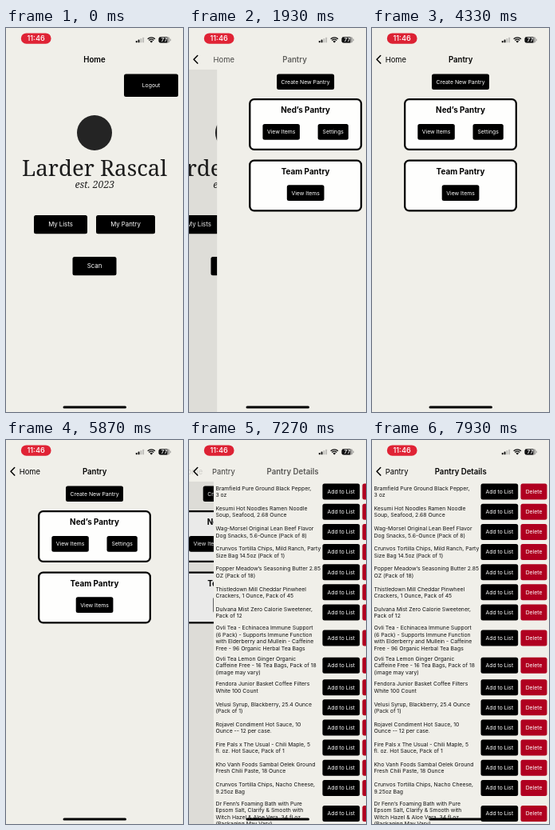
An HTML page with a canvas for the animation above (8000 ms loop, 222x480 px).

```html
<!DOCTYPE html>
<html lang="en">
<head>
<meta charset="utf-8">
<title>Pantry app</title>
<style>
html, body { margin: 0; width: 100%; height: 100%; overflow: hidden; background: #f0efe9; }
canvas { display: block; width: 100vw; height: 100vh; }
</style>
</head>
<body>
<canvas id="stage"></canvas>
<script>
const W = 222, H = 480, LOOP = 8000, TOP = 52;
const BG = '#f0efe9', INK = '#000', RED = '#b00020';
const SANS = 'Inter, Roboto, sans-serif', SERIF = '"Noto Serif", serif';
const PUSH_PANTRY = 1750, PUSH_DETAILS = 7081;

const canvas = document.getElementById('stage');
const c = canvas.getContext('2d');

const items = [
  ['Bramfield Pure Ground Black Pepper,', '3 oz'],
  ['Kesumi Hot Noodles Ramen Noodle', 'Soup, Seafood, 2.68 Ounce'],
  ['Wag-Morsel Original Lean Beef Flavor', 'Dog Snacks, 5.6-Ounce (Pack of 8)'],
  ['Crunvos Tortilla Chips, Mild Ranch, Party', 'Size Bag 14.5oz (Pack of 1)'],
  ['Popper Meadow\u2019s Seasoning Butter 2.85', 'OZ (Pack of 18)'],
  ['Thistledown Mill Cheddar Pinwheel', 'Crackers, 1 Ounce, Pack of 45'],
  ['Dulvana Mist Zero Calorie Sweetener,', 'Pack of 12'],
  ['Ovli Tea - Echinacea Immune Support', '(6 Pack) - Supports Immune Function',
   'with Elderberry and Mullein - Caffeine', 'Free - 96 Organic Herbal Tea Bags'],
  ['Ovli Tea Lemon Ginger Organic', 'Caffeine Free - 16 Tea Bags, Pack of 18', '(image may vary)'],
  ['Fendora Junior Basket Coffee Filters', 'White 100 Count'],
  ['Velusi Syrup, Blackberry, 25.4 Ounce', '(Pack of 1)'],
  ['Rojavel Condiment Hot Sauce, 10', 'Ounce -- 12 per case.'],
  ['Fire Pals x The Usual - Chili Maple, 5', 'fl. oz. Hot Sauce, Pack of 1'],
  ['Kho Vanh Foods Sambal Oelek Ground', 'Fresh Chili Paste, 18 Ounce'],
  ['Crunvos Tortilla Chips, Nacho Cheese,', '9.25oz Bag'],
  ['Dr Fenn\u2019s Foaming Bath with Pure', 'Epsom Salt, Clarify & Smooth with',
   'Witch Hazel & Aloe Vera, 34 fl oz', '(Packaging May Vary)']
];

const clamp = v => Math.max(0, Math.min(1, v));
const easeInOut = v => v < .5 ? 2 * v * v : 1 - 2 * (1 - v) * (1 - v);

// Critically damped spring, 0 to 1.
function spring(ms) {
  if (ms <= 0) return 0;
  const k = ms * .01825, rest = (1 + k) * Math.exp(-k);
  return rest < .001 ? 1 : 1 - rest;
}

// Opacity of a touched button: fades down, then back.
function touch(t, down, up) {
  return 1 - .8 * (easeInOut(clamp((t - down) / 150)) - easeInOut(clamp((t - up) / 220)));
}

function text(str, x, y, size, color = INK, weight = 400, align = 'center', family = SANS) {
  c.font = `${weight} ${size}px ${family}`;
  c.textAlign = align;
  c.fillStyle = color;
  c.fillText(str, x, y + size * .36);
}

function box(x, y, w, h, r, fill) {
  c.beginPath();
  c.roundRect(x, y, w, h, r);
  c.fillStyle = fill;
  c.fill();
}

function faded(alpha, draw) {
  if (alpha <= 0) return;
  c.save();
  c.globalAlpha *= Math.min(1, alpha);
  draw();
  c.restore();
}

function button(label, x, y, w, h, size = 6.85, fill = INK) {
  box(x, y, w, h, 2.5, fill);
  text(label, x + w / 2, y + h / 2, size, '#fff');
}

function card(title, y) {
  box(40, y, 142, 65, 6.5, INK);
  box(42.3, y + 2.3, 137.4, 60.4, 4.2, '#fefefd');
  text(title, 111, y + 14.5, 9.9, INK, 700);
}

function homePage(t) {
  button('Logout', 148, 57.5, 68, 28.5);
  c.beginPath();
  c.arc(111, 131, 22, 0, 7);
  c.fillStyle = '#242424';
  c.fill();
  text('Larder Rascal', 111, 175.5, 27.7, '#1c1c1c', 400, 'center', SERIF);
  text('est. 2023', 111.2, 196, 12.2, '#222', 'italic 400', 'center', SERIF);
  button('My Lists', 35, 234, 67, 23.3, 7.8);
  faded(touch(t, 1620, 1740), () => button('My Pantry', 113, 234, 74, 23.3, 7.8));
  button('Scan', 83.5, 286, 55, 23.3, 7.8);
}

function pantryPage(t) {
  button('Create New Pantry', 75, 57.5, 72, 19.5);
  card('Ned\u2019s Pantry', 88);
  button('View Items', 57.3, 120, 46.5, 19.8);
  button('Settings', 126.5, 120, 38.3, 19.8);
  card('Team Pantry', 164.5);
  faded(touch(t, 6600, 6830), () => button('View Items', 87.7, 196.3, 46.7, 19.6));
}

function detailsPage() {
  const line = 8.4;
  let y = TOP;
  for (const rows of items) {
    const h = rows.length === 2 ? 25.15 : rows.length === 3 ? 29.5 : 39;
    const mid = y + h / 2;
    rows.forEach((s, i) =>
      text(s, 2.5, mid + (i - (rows.length - 1) / 2) * line, 6.85, '#111', 400, 'left'));
    button('Add to List', 136.5, mid - 10, 46.7, 20);
    button('Delete', 186.5, mid - 10, 33, 20, 6.85, RED);
    y += h;
  }
}

function page(draw, x, t) {
  c.save();
  c.translate(x, 0);
  c.fillStyle = BG;
  c.fillRect(0, TOP, W, H);
  draw(t);
  c.restore();
}

function push(from, to, p, t) {
  c.save();
  c.beginPath();
  c.rect(0, TOP, W, H - TOP);
  c.clip();
  if (p < 1) {
    page(from, -.3 * W * p, t);
    c.fillStyle = `rgba(0,0,0,${.09 * p})`;
    c.fillRect(0, TOP, W, H);
  }
  if (p > 0) page(to, W * (1 - p), t);
  c.restore();
}

function chevron() {
  c.beginPath();
  c.moveTo(10.7, 34.5);
  c.lineTo(6, 39.3);
  c.lineTo(10.7, 44.1);
  c.lineWidth = 1.5;
  c.lineCap = c.lineJoin = 'round';
  c.strokeStyle = INK;
  c.stroke();
}

const backLabel = (s, x) => text(s, x, 39.2, 9.4, INK, 400, 'left');
const heading = (s, x) => text(s, x, 39.2, 9.65, INK, 600);

function header(title, next, back, p) {
  const rest = 1 - p;
  faded(back ? 1 : p * 1.6, chevron);
  if (back) faded(rest, () => backLabel(back, 16.7 - 30 * p));
  faded(1 - p * 1.2, () => heading(title, 111 - 54 * p));
  faded(p * p, () => backLabel(title, 16.7 + 88 * rest));
  faded(p ** 3, () => heading(next, 111.2 + 135 * rest));
}

function statusBar(t) {
  const glow = .5 + .5 * Math.cos((t - 1770) / 1000 * Math.PI);
  box(18.8, 6.4, 37.8, 13.4, 6.7, `rgb(${218 + 6 * glow},${32 + 3 * glow},${50 + 3 * glow})`);
  text('11:46', 37.6, 13.1, 9.2, '#fff', 500);

  for (let i = 0; i < 4; i++) {
    const h = 2.4 + i * 1.4;
    box(162.8 + i * 2.8, 18.3 - h, 1.9, h, .6, i < 2 ? '#111' : '#bdbcb8');
  }

  c.strokeStyle = '#111';
  c.lineCap = 'butt';
  c.lineWidth = 1.4;
  for (const r of [6.5, 4.2]) {
    c.beginPath();
    c.arc(182.3, 18.4, r, -Math.PI * .75, -Math.PI * .25);
    c.stroke();
  }
  c.beginPath();
  c.moveTo(182.3, 18.6);
  c.arc(182.3, 18.6, 2.6, -Math.PI * .75, -Math.PI * .25);
  c.fillStyle = '#111';
  c.fill();

  c.save();
  c.beginPath();
  c.roundRect(191.5, 11.2, 14, 7.4, 2.3);
  c.clip();
  c.fillStyle = '#a5a4a1';
  c.fillRect(191, 11, 15, 8);
  c.fillStyle = '#111';
  c.fillRect(191, 11, 11.3, 8);
  c.restore();
  box(206.1, 13.6, .9, 2.6, .4, '#a5a4a1');
  text('77', 198.4, 14.9, 6.6, '#fff', 600);
}

function draw(t) {
  c.fillStyle = BG;
  c.fillRect(0, 0, W, H);
  if (t < PUSH_DETAILS) {
    const p = spring(t - PUSH_PANTRY);
    push(homePage, pantryPage, p, t);
    header('Home', 'Pantry', '', p);
  } else {
    const p = spring(t - PUSH_DETAILS);
    push(pantryPage, detailsPage, p, t);
    header('Pantry', 'Pantry Details', 'Home', p);
  }
  statusBar(t);
  box(71.5, 472.5, 79.5, 3, 1.5, INK);
}

function resize() {
  const dpr = window.devicePixelRatio || 1;
  canvas.width = Math.round(innerWidth * dpr);
  canvas.height = Math.round(innerHeight * dpr);
  c.setTransform(canvas.width / W, 0, 0, canvas.height / H, 0, 0);
}

const start = performance.now();
function tick() {
  draw((performance.now() - start) % LOOP);
  requestAnimationFrame(tick);
}
addEventListener('resize', resize);
resize();
tick();
</script>
</body>
</html>
```
